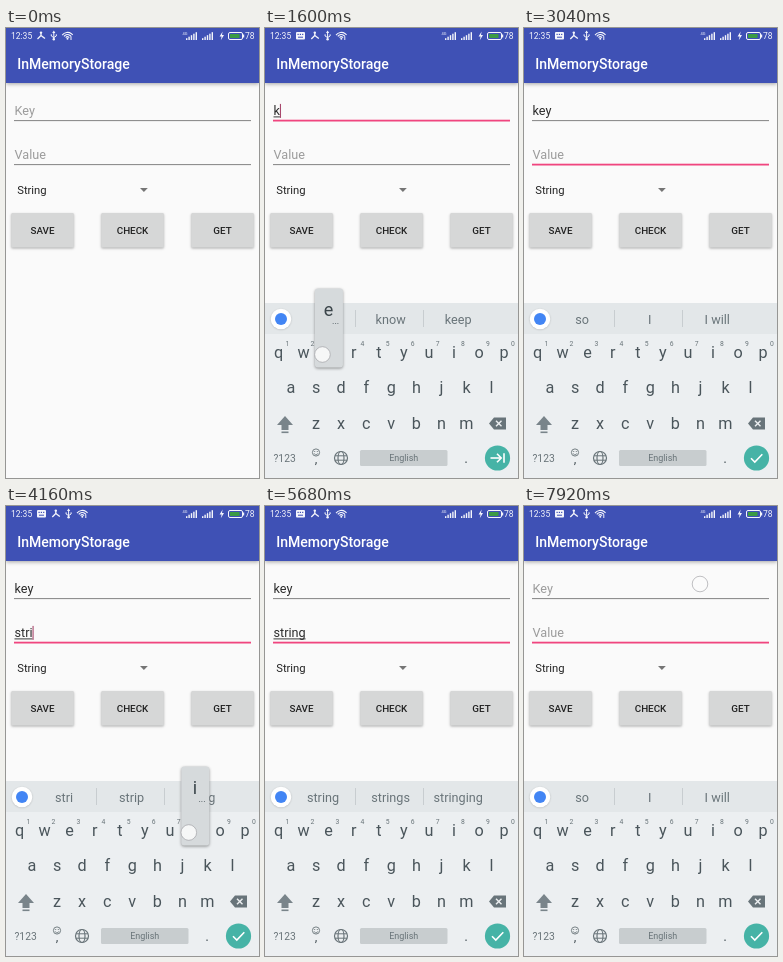
An HTML page with a canvas that plays this animation: 253 px wide and 450 px high, repeating every 8 s.

```html
<!DOCTYPE html>
<html lang="en">
<head>
<meta charset="utf-8">
<title>InMemoryStorage</title>
<style>
html, body { margin: 0; width: 100%; height: 100%; overflow: hidden; background: #fafafa; }
canvas { display: block; width: 253px; height: 450px; }
</style>
</head>
<body>
<canvas id="stage"></canvas>
<script>
const W = 253, H = 450, LOOP = 8000, STEP = 80;
const PINK = '#f0457f', INK = '#4a555b', SOFT = '#697479';
const canvas = document.getElementById('stage');
const dpr = window.devicePixelRatio || 1;
canvas.width = W * dpr;
canvas.height = H * dpr;
const g = canvas.getContext('2d');

// Form state from a given time on
const states = [
  { at: 0, focus: '' },
  { at: 200, focus: 'key' },
  { at: 1360, focus: 'key', key: 'k', hints: 'k,know,keep' },
  { at: 1760, focus: 'key', key: 'ke', hints: 'ke,keep,key' },
  { at: 2240, focus: 'key', key: 'key', hints: 'key,keys,keyboard' },
  { at: 2540, focus: 'value', key: 'key' },
  { at: 3360, focus: 'value', key: 'key', value: 's', hints: 's,so,she' },
  { at: 3600, focus: 'value', key: 'key', value: 'st', hints: 'st,still,start' },
  { at: 3840, focus: 'value', key: 'key', value: 'str', hints: 'str,street,strong' },
  { at: 4160, focus: 'value', key: 'key', value: 'stri', hints: 'stri,strip,string' },
  { at: 4640, focus: 'value', key: 'key', value: 'strin', hints: 'strin,string,strings' },
  { at: 5120, focus: 'value', key: 'key', value: 'string', hints: 'string,strings,stringing' },
  { at: 6400, focus: 'value' }
];

const presses = [
  ['k', 1200, 1440], ['e', 1600, 1840], ['y', 2080, 2320],
  ['s', 3200, 3440], ['t', 3440, 3680], ['r', 3760, 3920],
  ['i', 4080, 4240], ['n', 4480, 4720], ['g', 4960, 5200]
];

const taps = [
  [150, 80, 80, 320], [230, 429, 2480, 2720],
  [38, 204, 5920, 6160], [176, 78, 7920, 8000]
];

const rows = [['qwertyuiop', 13.5, 329.5], ['asdfghjkl', 26, 364.5], ['zxcvbnm', 51, 400.5]];
const PITCH = 25.07;

function text(s, x, y, size, color, weight = 400, align = 'left') {
  g.font = `${weight} ${size}px Roboto, "Noto Sans", sans-serif`;
  g.fillStyle = color;
  g.textAlign = align;
  g.fillText(s, x, y);
}

function rect(x, y, w, h, color) {
  g.fillStyle = color;
  g.fillRect(x, y, w, h);
}

function round(x, y, w, h, r, color) {
  g.fillStyle = color;
  g.beginPath();
  g.roundRect(x, y, w, h, r);
  g.fill();
}

function disc(x, y, r, color) {
  g.fillStyle = color;
  g.beginPath();
  g.arc(x, y, r, 0, 7);
  g.fill();
}

function line(points, color, width = 1) {
  g.strokeStyle = color;
  g.lineWidth = width;
  g.beginPath();
  points.forEach(([x, y], i) => i ? g.lineTo(x, y) : g.moveTo(x, y));
  g.stroke();
}

function shape(points, color) {
  g.fillStyle = color;
  g.beginPath();
  points.forEach(([x, y]) => g.lineTo(x, y));
  g.fill();
}

function arc(x, y, r, a, b, color, width = 1) {
  g.strokeStyle = color;
  g.lineWidth = width;
  g.beginPath();
  g.arc(x, y, r, a, b);
  g.stroke();
}

function shadowed(blur, dy, alpha, draw) {
  g.save();
  g.shadowColor = `rgba(0,0,0,${alpha})`;
  g.shadowBlur = blur * dpr;
  g.shadowOffsetY = dy * dpr;
  draw();
  g.restore();
}

function statusBar(typing) {
  const c = '#f4f5fb';
  text('12:35', 5, 11, 8.5, c);
  g.save();
  if (typing) {
    round(31, 4, 9, 7.5, 1, c);
    for (let i = 0; i < 3; i++) rect(32.5 + i * 2.3, 5.8, 1.2, 1.2, '#3f51b5');
    rect(33, 8.7, 5, 1, '#3f51b5');
    g.translate(14.8, 0);
  }
  line([[35, 4], [35, 7.5], [31.5, 11]], c, 1.3);
  line([[35, 7.5], [39, 10.5]], c, 1.3);
  disc(35, 4.6, 1.2, c);
  line([[47.8, 4], [47.8, 11.5]], c);
  line([[45.3, 6.3], [45.3, 8], [47.8, 9.6], [50.3, 8], [50.3, 6.3]], c);
  disc(47.8, 11.2, 1.2, c);
  shape([[46.2, 5], [47.8, 2.6], [49.4, 5]], c);
  for (let i = 1; i < 4; i++) arc(61.5, 11, i * 2.2, -2.5, -0.65, c, 1.1);
  disc(61.5, 10.8, 1, c);
  line([[65, 8.3], [65, 12]], c);
  g.restore();

  text('4G', 176.5, 6.8, 4, c);
  for (const x of [180, 196]) {
    for (let i = 0; i < 5; i++) rect(x + i * 2.4, 10.2 - i * 1.5, 1.4, 1.8 + i * 1.5, c);
  }
  shape([[216.6, 3.6], [213.6, 8.4], [215.6, 8.4], [214.8, 12.2], [218, 7], [216, 7]], c);
  g.strokeStyle = c;
  g.lineWidth = 1;
  g.beginPath();
  g.roundRect(222.5, 4.5, 14, 7, 1.5);
  g.stroke();
  rect(224, 6, 9.5, 4, '#3b9a45');
  rect(237, 6.5, 1.2, 3, c);
  text('78', 239, 11, 8.5, c);
}

function field(hint, value, y, focused, caret) {
  const base = y - 5.3;
  if (value) text(value, 8.5, base, 12.65, '#2b2b2b');
  else text(hint, 8.5, base, 12.65, '#9c9c9c');
  const w = value ? g.measureText(value).width : 0;
  if (focused && w) rect(8.5, base + 1.5, w, 1, '#3a3a3a');
  if (focused && caret) rect(8.5 + w, base - 11, 1.1, 14, '#a8486c');
  if (focused) rect(8, y - 0.5, 237, 1.8, PINK);
  else rect(8, y, 237, 0.9, '#767676');
}

function button(label, x) {
  shadowed(2.5, 1, 0.3, () => round(x, 185, 62.5, 34.5, 1.2, '#d6d7d7'));
  text(label, x + 31.2, 206, 9.84, '#212121', 500, 'center');
}

function ripple(t) {
  const p = (t - 5920) / 480;
  if (p < 0 || p >= 1) return;
  g.save();
  g.beginPath();
  g.rect(5, 185, 62.5, 34.5);
  g.clip();
  disc(38, 204, 12 + 50 * p, `rgba(0,0,0,${0.14 * (1 - p * p)})`);
  g.restore();
}

function keyboard(hints, done) {
  rect(0, 275, W, 175, '#eceff1');
  rect(0, 275, W, 31, '#e3e7e9');
  shadowed(2, 0.5, 0.2, () => disc(16, 291, 10.3, '#fff'));
  disc(16, 291, 6, '#4285f4');
  hints.split(',').forEach((s, i) => text(s, 58 + i * 67.6, 295.5, 12.65, SOFT, 400, 'center'));
  for (const x of [90, 158]) rect(x, 282, 1, 17, '#c8cdd0');

  rows.forEach(([letters, x, y], r) => [...letters].forEach((s, i) => {
    const cx = x + i * PITCH;
    text(s, cx, y, 16.2, INK, 400, 'center');
    if (!r) text(String((i + 1) % 10), cx + 8.8, 317.5, 6.8, SOFT, 400, 'center');
  }));

  shape([[20, 388], [28, 397], [23.5, 397], [23.5, 402], [16.5, 402], [16.5, 397], [12, 397]], '#79848a');
  rect(16.5, 403.5, 7, 1.6, '#79848a');
  shape([[224, 395.5], [229, 389.5], [241, 389.5], [241, 401.5], [229, 401.5]], '#68747a');
  line([[231, 392.8], [236.5, 398.3]], '#eceff1', 1.4);
  line([[236.5, 392.8], [231, 398.3]], '#eceff1', 1.4);

  text('?123', 8.5, 434, 10.3, SOFT);
  arc(51, 424.5, 3.6, 0, 7, SOFT, 0.9);
  arc(51, 425, 1.8, 0.2, 2.94, SOFT, 0.8);
  disc(49.7, 423.5, 0.6, SOFT);
  disc(52.3, 423.5, 0.6, SOFT);
  text(',', 51, 434.5, 13, INK, 400, 'center');

  arc(76, 430, 6.5, 0, 7, SOFT, 1.2);
  g.beginPath();
  g.ellipse(76, 430, 3, 6.5, 0, 0, 7);
  g.stroke();
  line([[70, 427.8], [82, 427.8]], SOFT);
  line([[70, 432.2], [82, 432.2]], SOFT);

  round(95, 422, 87.5, 16, 1.5, '#c8cdcf');
  text('English', 138.7, 433.3, 9, SOFT, 400, 'center');
  text('.', 201, 434.5, 14, INK, 400, 'center');

  disc(232.5, 430, 12.6, '#46b3a6');
  if (done) {
    line([[227, 430.3], [230.8, 434], [238.3, 426.3]], '#fff', 1.6);
  } else {
    line([[225.5, 430], [236, 430]], '#fff', 1.6);
    line([[232, 425.8], [236.2, 430], [232, 434.2]], '#fff', 1.6);
    line([[239, 425.3], [239, 434.7]], '#fff', 1.6);
  }
}

function finger(x, y) {
  disc(x, y, 7.8, 'rgba(250,250,250,0.88)');
  arc(x, y, 7.8, 0, 7, 'rgba(150,150,155,0.65)', 0.9);
}

function popup(letter) {
  const r = rows.findIndex(row => row[0].includes(letter));
  const [letters, x, y] = rows[r];
  const cx = x + letters.indexOf(letter) * PITCH;
  const top = y - 69;
  shadowed(3, 1, 0.4, () => round(cx - 13.7, top, 28, 79, 3, '#d6dadc'));
  text(letter, cx, top + 27, 18, '#3b454a', 400, 'center');
  if ('ertyisn'.includes(letter)) text('...', cx + 7, top + 35.5, 9, INK, 400, 'center');
  finger(cx - (r ? 3 : 6.2), y - 3);
}

function draw(t) {
  const s = states.filter(e => e.at <= t).pop();
  const caret = Math.floor((t - s.at) / 500) % 2 === 0;
  g.setTransform(dpr, 0, 0, dpr, 0, 0);
  rect(0, 0, W, H, '#fafafa');
  shadowed(4, 1, 0.35, () => rect(0, 0, W, 55, '#3f51b5'));
  statusBar(t >= 640);
  text('InMemoryStorage', 11.2, 40.7, 14.05, '#fff', 500);

  field('Key', s.key, 92.2, s.focus === 'key', caret);
  field('Value', s.value, 136.2, s.focus === 'value', caret);
  text('String', 11.2, 165.6, 11.25, '#242424');
  shape([[134, 160], [141.8, 160], [137.9, 164]], '#757575');
  ['SAVE', 'CHECK', 'GET'].forEach((label, i) => button(label, 5.3 + i * 90));
  ripple(t);

  if (t >= 640) {
    const p = Math.min(1, (t - 560) / 270);
    g.save();
    g.globalAlpha = Math.min(1, p * 2);
    g.translate(0, 175 * (1 - p) ** 3);
    keyboard(s.hints || 'so,I,I will', s.focus === 'value');
    g.restore();
  }
  for (const [letter, a, b] of presses) if (t >= a && t < b) popup(letter);
  for (const [x, y, a, b] of taps) if (t >= a && t < b) finger(x, y);
}

const start = performance.now();
function tick() {
  const t = (performance.now() - start) % LOOP;
  draw(Math.floor(t / STEP) * STEP);
  requestAnimationFrame(tick);
}
tick();
</script>
</body>
</html>
```
